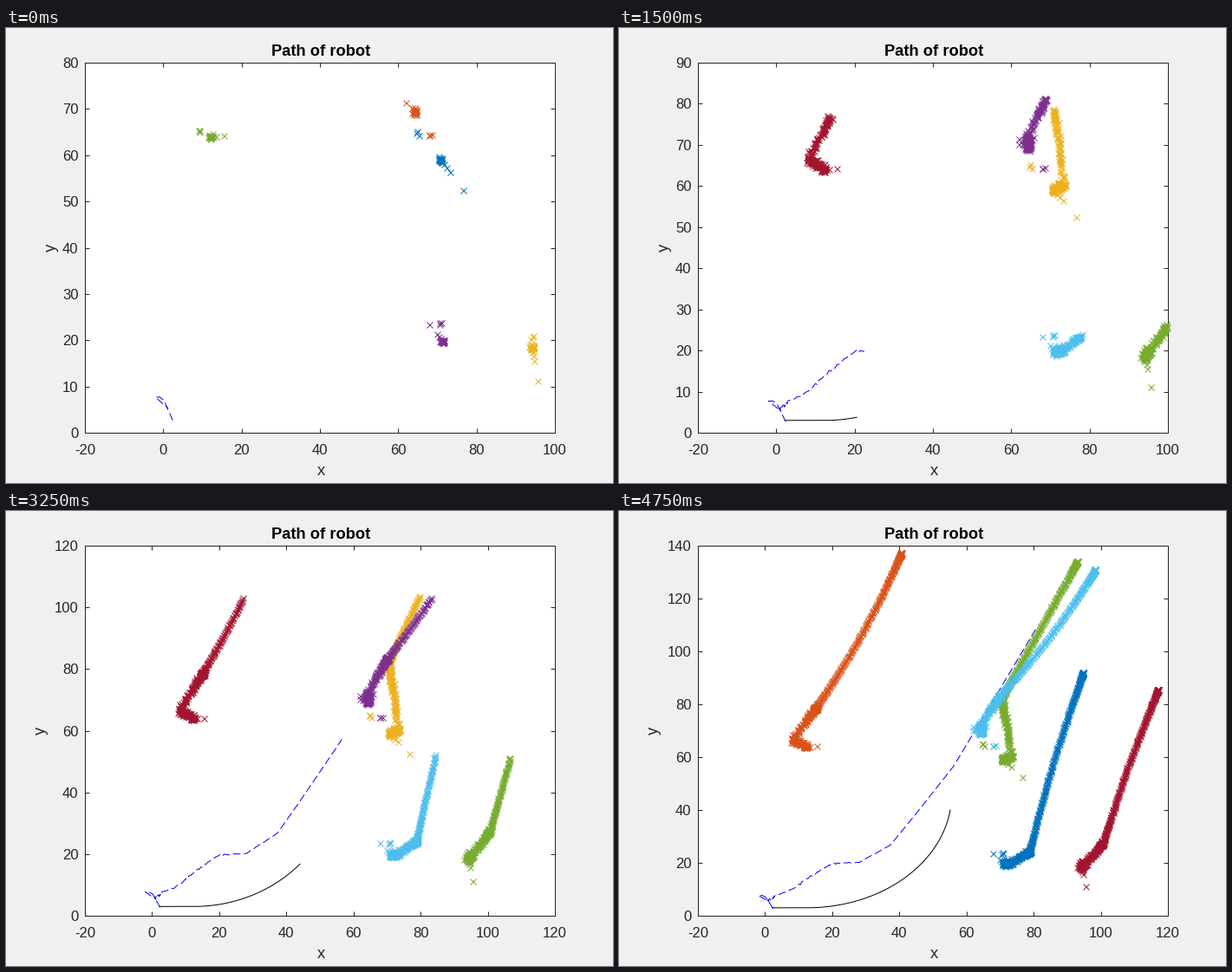
A matplotlib script that plays this animation: 700 by 525 pixels, repeating every 5000 ms.

```python
import numpy as np
import matplotlib.pyplot as plt
from matplotlib.animation import FuncAnimation

W, H, DPI = 700, 525, 100
FRAMES, STEPS = 20, 25
PX = 72 / DPI
DARK = "#262626"
COLORS = ["#0072BD", "#D95319", "#EDB120", "#7E2F8E",
          "#77AC30", "#4DBEEE", "#A2142F"]

plt.rcParams["font.family"] = "Liberation Sans"
plt.rcParams["axes.unicode_minus"] = False

rng = np.random.default_rng(4)

# Per landmark: start, turn, knee, end, two first guesses, sideways bow
LANDMARKS = [
    ((70.8, 59), (73.2, 60.3), (70.3, 82.2), (92.9, 134), (76.6, 52.5), (64.7, 65), 0),
    ((64.3, 69.4), (63.8, 72), (69.8, 83.2), (98.3, 131), (62, 71.4), (68.3, 64.5), 1.5),
    ((94.1, 18.6), (95, 20), (100.4, 27.2), (117, 85.6), (95.5, 11.2), (94, 20.6), -.6),
    ((71.2, 19.8), (72.8, 20.2), (78.6, 24.2), (94.6, 92), (67.8, 23.5), (70.5, 23.9), -.8),
    ((12, 64), (8, 67), (15, 78.7), (40.5, 137.3), (15.4, 64.2), (9.1, 65.3), 1.5),
]

times = np.r_[np.zeros(20), np.arange(1, (FRAMES - 1) * STEPS + 1) / STEPS]
spread = np.interp(times, [0, .4, 2.7, 3.2, 9, 10.5], [.3, .55, .55, .33, .3, .1])


def span(t0, t1):
    return np.clip((times - t0) / (t1 - t0), 0, 1)


def cloud(start, turn, knee, end, first, second, bow):
    """Stray guesses, then noisy estimates drifting in three eased stages."""
    start, turn, knee, end, first, second = map(
        np.array, (start, turn, knee, end, first, second))
    wander = span(0, 3)
    climb = 1 - (1 - span(3, 9)) ** 2.6
    run = 1 - (1 - span(9, 19) ** 1.8) ** 2.5
    mean = (start + np.outer(wander, turn - start)
            + np.outer(climb, knee - turn) + np.outer(run, end - knee))
    mean[:, 0] += bow * np.sin(np.pi * run)
    pts = mean + rng.normal(0, 1, mean.shape) * spread[:, None]
    settle = start + np.outer([1, .4, .25, .15], first - start)
    retry = second + rng.normal(0, .35, (3, 2))
    return np.r_[settle, retry, pts]


clouds = [cloud(*mark) for mark in LANDMARKS]
stamps = np.r_[np.zeros(7), times]


def travelled(f):
    return np.interp(f, [1.5, 4, 6, 9, 19], [0, 8.8, 18.4, 28.3, 71.9])


def driven(f):
    """Straight run followed by a circular left turn."""
    s = np.linspace(0, travelled(f), 200)
    straight, radius = 10.3, 43.1
    angle = np.maximum(s - straight, 0) / radius
    return (2.2 + np.minimum(s, straight) + radius * np.sin(angle),
            3 + radius * (1 - np.cos(angle)))


# Estimated path: a first loop, then a noisy run to the upper right
LOOP = np.array([(2.4, 2.7), (.2, 7), (-.9, 7.7), (-2, 7.7), (1.2, 5.3)])
RUN = np.array([(.8, 6), (4.3, 8.2), (8.2, 10.1), (13.3, 14.8), (20, 19.7),
                (28, 20.2), (34.2, 24.5), (37.3, 26.7), (44.3, 37.5),
                (56.2, 56.6), (81, 109.2)])
run_x = np.r_[np.arange(.8, 3, .15), np.arange(3, 81, .5), 81]
run_y = np.interp(run_x, *RUN.T)
run_y += rng.normal(0, 1, run_x.size) * np.interp(run_x, [.8, 3, 20, 36], [.4, .2, .15, .03])


def estimated(f):
    end = np.interp(travelled(f), [0, 8.8, 28.3, 44.9, 71.9],
                    [1.2, 11.9, 34.2, 56.2, 81])
    on = (run_x <= end) & (f > 0)
    return np.r_[LOOP[:, 0], run_x[on]], np.r_[LOOP[:, 1], run_y[on]]


fig = plt.figure(figsize=(W / DPI, H / DPI), dpi=DPI, facecolor="#f0f0f0")
ax = fig.add_axes([91 / W, 58 / H, 542 / W, 427 / H])
ax.set_axisbelow(True)
ax.tick_params(direction="in", top=True, right=True, length=5.4 * PX,
               width=PX, color=DARK, labelcolor=DARK, labelsize=12)
ax.tick_params(axis="x", pad=13 * PX)
ax.tick_params(axis="y", pad=7.5 * PX)
for side in ax.spines.values():
    side.set(color=DARK, linewidth=PX, zorder=1)


def label(x, y, text, **kw):
    return fig.text(x / W, 1 - y / H, text, fontsize=13.2, ha="center",
                    va="baseline", rotation_mode="anchor", **kw)


label(363, 32, "Path of robot", color="black", weight="bold")
label(363, 516, "x", color=DARK)
y_label = label(57, 253, "y", color=DARK, rotation=90)

black, = ax.plot([], [], color="black", lw=PX)
blue, = ax.plot([], [], color="blue", lw=PX, dash_capstyle="butt")
blue.set_linestyle((0, (9, 4)))
marks = [ax.plot([], [], "x", ms=7 * PX, mew=PX, clip_on=False)[0]
         for _ in clouds]


def set_axes(f):
    x_max = 100 if f < 7 else 120
    y_max = 80 + 10 * (f >= 5) + 10 * (f >= 11) + 20 * (f >= 13) + 20 * (f >= 15)
    ax.set_xlim(-20, x_max)
    ax.set_ylim(0, y_max)
    ax.set_xticks(range(-20, x_max + 1, 20))
    ax.set_yticks(range(0, y_max + 1, 10 if y_max <= 100 else 20))
    y_label.set_x((57 if y_max < 100 else 45) / W)


def update(f):
    set_axes(f)
    black.set_data(*driven(f))
    blue.set_data(*estimated(f))
    shown = stamps <= f + 1e-6
    for k, (mark, pts) in enumerate(zip(marks, clouds)):
        mark.set_data(*pts[shown].T)
        mark.set_color(COLORS[(5 * f + k) % 7])
    return [black, blue, *marks]


anim = FuncAnimation(fig, update, frames=FRAMES, interval=250,
                     init_func=lambda: update(0), repeat=True, repeat_delay=0)
plt.show()
```
